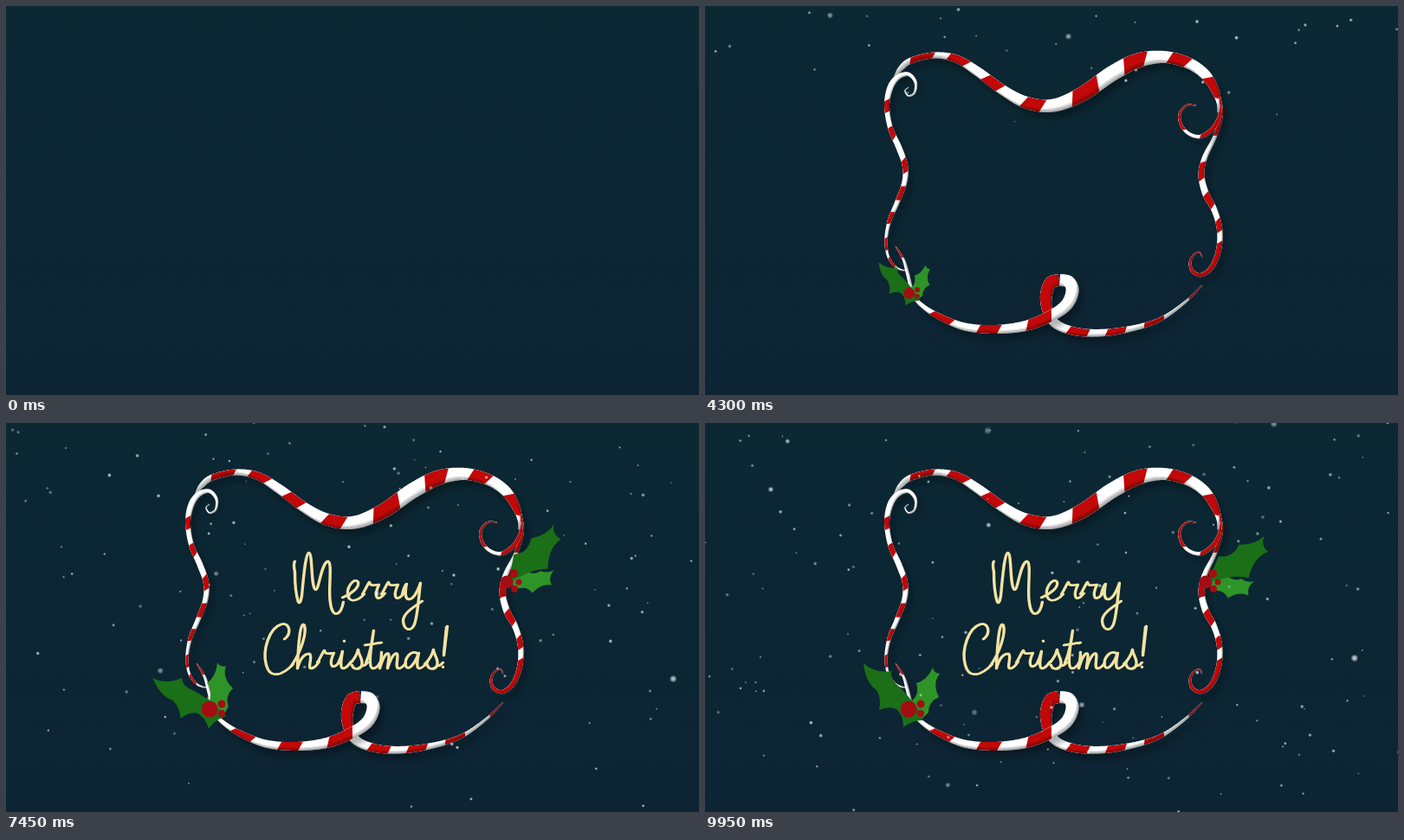
These frames come from a looping animation (800 px wide and 450 px high, 10000 ms). An HTML page with a canvas:

```html
<!DOCTYPE html>
<html lang="en">
<head>
<meta charset="utf-8">
<title>Merry Christmas!</title>
<style>
  html, body { margin: 0; overflow: hidden; background: #0b2633; }
  canvas { display: block; }
</style>
</head>
<body>
<canvas id="stage" width="800" height="450" role="img" aria-label="Merry Christmas!"></canvas>
<script>
const LOOP = 10000;
const ctx = document.getElementById('stage').getContext('2d');
const clamp = (v, lo = 0, hi = 1) => Math.min(hi, Math.max(lo, v));
const progress = (t, from, to) => clamp((t - from) / (to - from));
const smooth = u => u * u * (3 - 2 * u);
const backOut = u => 1 + 2.2 * (u - 1) ** 3 + 1.2 * (u - 1) ** 2;
const random = (i, k) => {
  const v = Math.sin(i * 12.9898 + k * 78.233) * 43758.5453;
  return v - Math.floor(v);
};

// ---- Candy cane ribbons: knots are x,y,width ----

function spline(text) {
  const knots = text.split(' ').map(k => k.split(',').map(Number));
  const knot = i => knots[clamp(i, 0, knots.length - 1)];
  const points = [];
  for (let k = 0; k < knots.length - 1; k++) {
    const [a, b, c, d] = [knot(k - 1), knot(k), knot(k + 1), knot(k + 2)];
    const steps = Math.round(Math.hypot(c[0] - b[0], c[1] - b[1]));
    for (let s = 0; s < steps; s++) {
      const u = s / steps;
      const [x, y, w] = b.map((v, j) => v + u / 2 * (c[j] - a[j] +
        u * (2 * a[j] - 5 * v + 4 * c[j] - d[j] + u * (3 * (v - c[j]) + d[j] - a[j]))));
      points.push({ x, y, w });
    }
  }
  points.forEach((p, i) => {
    const q = points[Math.max(0, i - 1)], r = points[Math.min(points.length - 1, i + 1)];
    const len = Math.hypot(r.x - q.x, r.y - q.y) || 1;
    p.nx = (r.y - q.y) / len;
    p.ny = (q.x - r.x) / len;
  });
  return points;
}

// Stripe borders are given where the ribbon passes a value on one axis; 0 means its start.
function makeRibbon(start, end, axis, slant, cutText, knots) {
  const points = spline(knots);
  const cuts = [];
  for (const c of cutText.split(' ').map(Number)) {
    const last = cuts[cuts.length - 1] || 0;
    const at = points.findIndex((p, i) => i > last && p[axis] >= c && points[i - 1][axis] < c);
    cuts.push(c ? (at < 0 ? points.length : at) : 0);
  }
  const depth = Math.max(...points.map(p => p.w)) * 0.24;
  return { start, end, slant, points, cuts, depth };
}

const ribbons = [
  makeRibbon(0, 2700, 'x', 1,
    '236 264 281 301 323 341 368 390 424 453 483 508 536 557 580 592',
    '219,82,2 226,72,6 238,63,7 264,57,7 290,61,9 315,76,11 345,98,12 372,112,14 402,115,15 ' +
    '435,102,17 470,78,18 500,63,17 530,59,14 558,66,13 578,80,12 589,98,9 593,112,5 592,124,1'),
  makeRibbon(2450, 3250, 'y', -1, '0 150 180 200 217 232 247 260 273',
    '594,104,2 596,125,4 589,150,4.5 577,175,6 573,195,7 578,217,8 588,236,7 594,258,6.5 ' +
    '593,282,6 585,302,5.5 573,311,4.5 563,307,4 560,297,3 564,288,2 571,285,1.5 574,291,1'),
  makeRibbon(2500, 3000, 'x', 1, '0 553 572',
    '567,115,1 556,115,2 548,125,3 550,138,3.5 559,148,4 572,151,4.5 585,143,5 593,130,4 596,114,2'),
  makeRibbon(0, 2100, 'y', -1, '108 122 140 152 177 192 208 224 238 251 268 282 291 301',
    '235,94,1 231,98,1.5 235,104,2 242,100,2.5 243,88,3.5 235,79,4.5 223,82,6 214,94,7 ' +
    '210,115,6 214,141,6 224,164,7 231,185,6.5 230,205,6 221,229,5.5 213,248,4.5 209,270,3.5 ' +
    '211,288,3 218,300,2.5 226,305,2 234,306,1'),
  makeRibbon(3680, 4200, 'x', 1, '0 399 419 442 463 485 507 530 558',
    '409,317,14 399,320,14 394,334,14 395,351,12 403,366,11 418,374,10 440,378,9 470,377,8 ' +
    '505,370,6 530,360,4.5 556,341,3 574,323,1'),
  makeRibbon(3050, 3700, 'x', 1, '0 228 262 285 315 340 372 400',
    '220,278,1 229,293,3 234,310,4 240,333,4 250,346,5 270,359,7 300,371,9 335,374,10 ' +
    '370,370,12 398,359,13 417,346,14 424,330,15 420,319,14 409,317,14')
];

function band({ points, slant }, from, to, limit) {
  const path = new Path2D();
  const shift = i => i <= 0 || i >= limit ? 0 : slant * points[i].w * 0.25;
  const range = side => [from, to].map(i =>
    Math.round(clamp(i + side * shift(i), 0, limit)));
  const add = (i, side) => {
    const p = points[i], r = side * p.w / 2;
    path.lineTo(p.x + p.nx * r, p.y + p.ny * r);
  };
  const [l0, l1] = range(1), [r0, r1] = range(-1);
  for (let i = l0; i <= l1; i++) add(i, 1);
  for (let i = r1; i >= r0; i--) add(i, -1);
  path.closePath();
  return path;
}

function drawRibbon(ribbon, t) {
  const limit = Math.floor((ribbon.points.length - 1) * progress(t, ribbon.start, ribbon.end));
  if (limit < 2) return;
  const outline = band(ribbon, 0, limit, limit);
  ctx.save();
  ctx.shadowColor = 'rgba(0,0,0,.3)';
  ctx.shadowBlur = 7;
  ctx.shadowOffsetX = 5;
  ctx.shadowOffsetY = 7;
  ctx.fillStyle = '#fff';
  ctx.fill(outline);
  ctx.shadowColor = 'transparent';
  ctx.clip(outline);
  ctx.fillStyle = '#c20808';
  const { cuts } = ribbon;
  for (let i = 0; i < cuts.length && cuts[i] < limit; i += 2) {
    ctx.fill(band(ribbon, cuts[i], Math.min(limit, cuts[i + 1] ?? limit), limit));
  }
  // Soft shade along the lower right edge
  const outside = new Path2D();
  outside.rect(-50, -50, 900, 550);
  outside.addPath(outline);
  ctx.fillStyle = 'rgba(0,0,0,.13)';
  for (let k = 0; k < 3; k++) {
    ctx.translate(-ribbon.depth / 4, -ribbon.depth / 3);
    ctx.fill(outside, 'evenodd');
  }
  ctx.restore();
}

// ---- Holly: leaves sway through [time, degrees] keys ----

const DARK = '#1b6f17', LIGHT = '#2f9427';
const hollies = [
  {
    x: 237, y: 335, start: 4150,
    leaves: [
      { color: LIGHT, keys: [[6000, 0], [8000, -24], [9700, 0]],
        shape: 'M263 283Q264 289 271 290Q262 301 270 317Q258 322 258 335L248 344Q238 332 238 322Q248 314 244 301Q256 298 263 283Z' },
      { color: DARK, keys: [[6000, 0], [7500, -16], [9700, 0]],
        shape: 'M183 278Q196 290 215 287Q214 297 222 303Q233 313 246 331L252 344Q241 343 229 352Q229 338 221 331Q212 327 201 332Q204 319 198 309Q185 300 183 278Z' }
    ],
    berries: [[235, 331, 9.5], [249, 325, 4.5], [249, 336, 4]]
  },
  {
    x: 580, y: 183, start: 4300,
    leaves: [
      { color: LIGHT, keys: [[6000, 0], [8000, -18], [9950, -1]],
        shape: 'M580 184Q592 176 604 178Q611 184 619 181Q626 186 634 184Q625 190 627 200Q616 195 603 203Q600 194 588 194Z' },
      { color: DARK, keys: [[6000, 0], [8500, -11], [9950, 6]],
        shape: 'M640 124Q636 135 646 142Q630 150 627 174Q611 173 598 178L580 184L590 153Q606 154 612 137Q630 136 640 124Z' }
    ],
    berries: [[578, 184, 7.5], [586, 174, 5], [592, 184, 3.5], [587, 192, 4], [574, 197, 4]]
  }
];
for (const { leaves } of hollies) for (const leaf of leaves) leaf.path = new Path2D(leaf.shape);

function sway([[t0, a], [t1, b], [t2, c]], t) {
  return a + (b - a) * smooth(progress(t, t0, t1)) + (c - b) * smooth(progress(t, t1, t2));
}

function dot(x, y, r) {
  ctx.beginPath();
  ctx.arc(x, y, r, 0, 2 * Math.PI);
  ctx.fill();
}

function drawHolly({ x, y, start, leaves, berries }, t) {
  if (t <= start) return;
  const size = Math.max(0, backOut(progress(t, start, start + 700)));
  ctx.save();
  ctx.translate(x, y);
  ctx.scale(size, size);
  for (const { color, keys, path } of leaves) {
    ctx.save();
    ctx.rotate(sway(keys, t) * Math.PI / 180);
    ctx.translate(-x, -y);
    ctx.fillStyle = color;
    ctx.fill(path);
    ctx.restore();
  }
  ctx.translate(-x, -y);
  ctx.fillStyle = '#a30d13';
  for (const berry of berries) dot(...berry);
  ctx.restore();
}

// ---- Lettering: start time, anchor x, anchor y, pen strokes ----

const R = 'M411 198C414 194 416 188 419 184C420 190 426 187 430 187C424 200 427 209 437 197';
const S = 'M396 279C402 273 405 267 406 262C406 268 413 274 410 281C407 286 400 285 399 280M410 281Q414 281 417 277';
const letters = [
  [4910, 360, 150, 'M333 160Q331 163 333 172Q333 195 337 207Q339 211 341 200C343 180 345 152 349 150C354 150 351 190 357 193C361 193 363 163 371 160C377 160 371 195 374 208C376 226 386 224 389 207'],
  [4870, 401, 165, 'M388 202C398 198 408 190 406 184C403 178 393 188 394 198C395 208 405 207 413 198'],
  [5430, 424, 150, R],
  [4790, 446, 150, R, 22],
  [4670, 468, 160, 'M457 198C459 190 460 187 462 186C460 196 460 204 465 204C471 203 475 194 478 185C476 200 475 222 471 233C467 242 459 240 458 229C458 220 470 213 480 206'],
  [4790, 314, 225, 'M321 250C330 243 327 230 317 233C304 237 295 262 300 280C304 296 318 293 331 279'],
  [5030, 347, 218, 'M329 281C340 265 347 243 344 234C340 228 337 250 336 284C339 272 345 266 350 267C354 270 347 284 352 284C356 284 359 279 361 276'],
  [4710, 371, 225, R, -52, 79],
  [4790, 389, 230, 'M383 278C386 272 387 268 388 264C386 276 385 284 389 284C393 283 396 279 398 276M390 252L390 252.6'],
  [4630, 404, 230, S],
  [4590, 423, 230, 'M415 278C420 265 423 250 424 240C421 258 417 283 423 284C427 284 430 280 432 276M414 257L433 254'],
  [4550, 446, 230, 'M433 265C433 272 432 278 431 284C435 270 439 265 441 267C443 270 440 278 440 284C444 270 449 265 451 267C453 271 448 284 453 284C456 284 459 280 461 278'],
  [5510, 473, 230, 'M475 267C468 261 459 272 461 281C464 288 472 278 476 266C474 276 473 284 477 284C481 283 484 279 486 277'],
  [4450, 491, 230, S, 87],
  [4400, 506, 230, 'M509 235L505 269M508 236L505 266M504 282L504 282.6']
].map(([start, x, y, strokes, dx = 0, dy = 0]) => ({ start, x, y, dx, dy, path: new Path2D(strokes) }));

function drawLetter({ start, x, y, dx, dy, path }, t) {
  const size = smooth(progress(t, start, start + 800));
  if (!size) return;
  ctx.save();
  ctx.translate(x, y);
  ctx.scale(size, size);
  ctx.translate(dx - x, dy - y);
  // A second pass to the side gives the upright strokes more weight
  ctx.stroke(path);
  ctx.translate(0.9, 0);
  ctx.stroke(path);
  ctx.restore();
}

// ---- Snow ----

function drawSnow(t) {
  ctx.fillStyle = '#e8f1f5';
  for (let i = 0; i < 225; i++) {
    const age = t - 3250 - i * 30;
    if (age < 0) break;
    const x = random(i, 1) * 800 + (random(i, 2) - 0.5) * 0.04 * age;
    const y = age * (0.045 + 0.11 * random(i, 3)) - 5;
    const r = 0.9 + 1.3 * random(i, 4) + (random(i, 5) > 0.95 ? 1.7 : 0);
    const alpha = 0.25 + 0.4 * random(i, 6);
    ctx.globalAlpha = alpha * 0.6;
    dot(x, y, r);
    ctx.globalAlpha = alpha;
    dot(x, y, r * 0.65);
  }
  ctx.globalAlpha = 1;
}

const night = ctx.createLinearGradient(0, 0, 0, 450);
night.addColorStop(0, '#0b2833');
night.addColorStop(1, '#0d2434');
ctx.lineCap = ctx.lineJoin = 'round';
ctx.lineWidth = 2.5;
ctx.strokeStyle = '#f3e3a0';

function draw() {
  const t = performance.now() % LOOP;
  ctx.fillStyle = night;
  ctx.fillRect(0, 0, 800, 450);
  for (const ribbon of ribbons) drawRibbon(ribbon, t);
  for (const holly of hollies) drawHolly(holly, t);
  for (const letter of letters) drawLetter(letter, t);
  drawSnow(t);
  requestAnimationFrame(draw);
}
draw();
</script>
</body>
</html>
```
